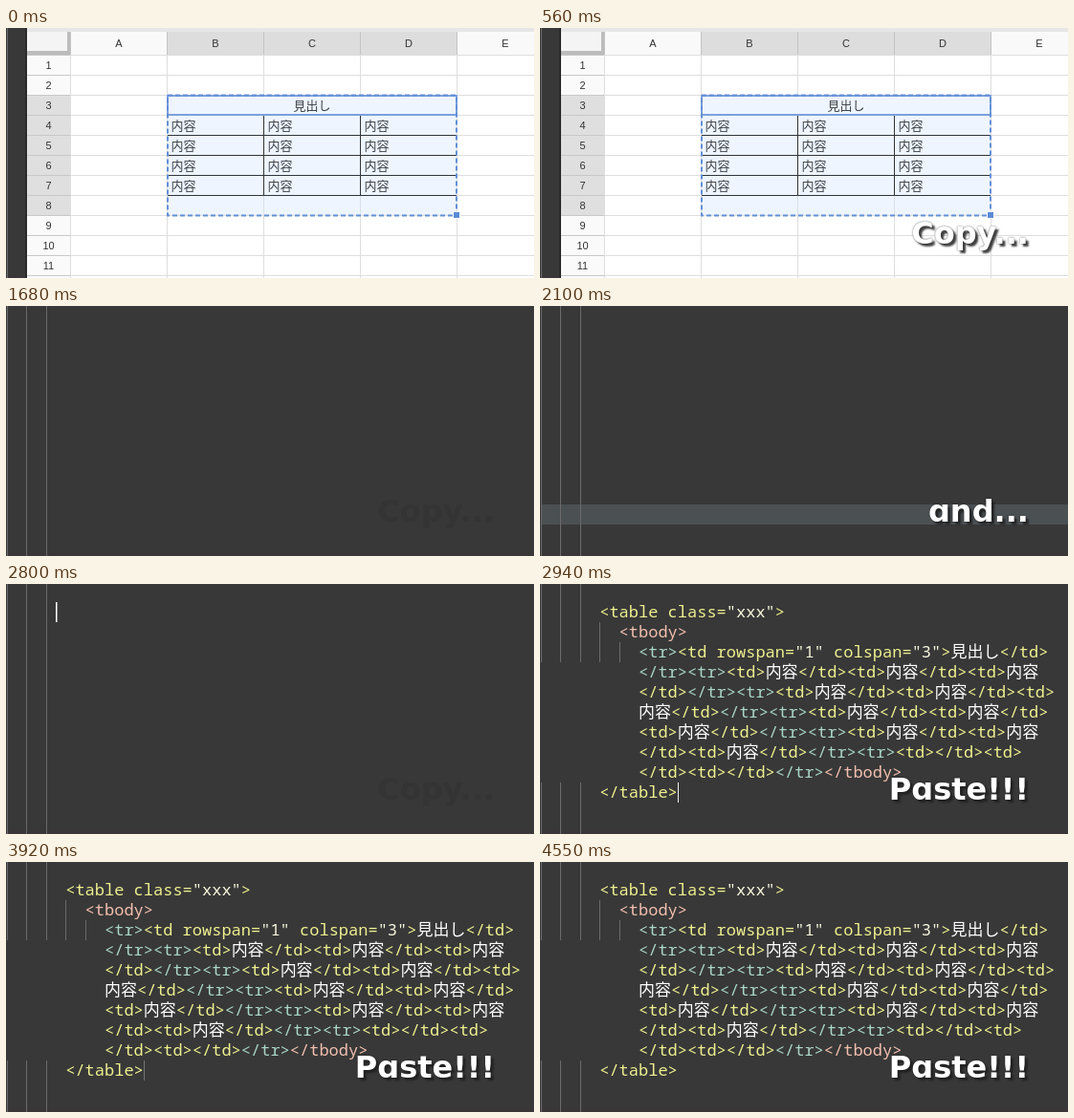
Animation of 552x262 px, one loop 4.62 s. Source, as an HTML page:

```html
<!DOCTYPE html>
<html lang="ja">
<head>
<meta charset="utf-8">
<title>Copy and paste a table</title>
<style>
html, body { margin: 0; width: 100%; height: 100%; overflow: hidden; background: #383838; }
#stage { position: relative; width: 552px; height: 262px; overflow: hidden; }
svg { position: absolute; left: 0; top: 0; display: block; }

.timed { opacity: 0; animation: 4620ms step-end infinite; }
.sheet { animation-name: sheet; }
.copy { animation-name: copy; }
.trace { animation-name: trace; }
.and { animation-name: and; }
.band { animation-name: band; }
.first-caret { animation-name: first-caret; }
.pasted { animation-name: pasted; }
.end-caret { animation-name: end-caret; }

@keyframes sheet { 0% { opacity: 1 } 36.363%, 100% { opacity: 0 } }
@keyframes copy { 0% { opacity: 0 } 10.606% { opacity: 1 } 34.848%, 100% { opacity: 0 } }
@keyframes trace {
  0% { opacity: 0 } 36.363% { opacity: 1 } 39.393% { opacity: 0 }
  60.606% { opacity: 1 } 63.636%, 100% { opacity: 0 }
}
@keyframes and { 0% { opacity: 0 } 39.393% { opacity: 1 } 60.606%, 100% { opacity: 0 } }
@keyframes band { 0% { opacity: 0 } 45.454% { opacity: 1 } 46.969%, 100% { opacity: 0 } }
@keyframes first-caret { 0% { opacity: 0 } 53.03% { opacity: 1 } 63.636%, 100% { opacity: 0 } }
@keyframes pasted { 0% { opacity: 0 } 63.636%, 100% { opacity: 1 } }
@keyframes end-caret {
  0% { opacity: 0 }
  63.636% { opacity: 1 }
  71.212% { opacity: 1; animation-timing-function: steps(6, start) }
  80.303% { opacity: 0 }
  83.333% { opacity: 0; animation-timing-function: steps(6, start) }
  92.424% { opacity: 1 }
  98.484%, 100% { opacity: 0 }
}

.caption {
  position: absolute; right: 41px; top: 197px; white-space: nowrap;
  font: bold 32px/37px "DejaVu Sans", sans-serif; color: #fff;
  text-shadow: 0 0 2px rgba(25,25,25,.7), 3px 3px 2px rgba(32,32,32,.85);
}
.caption.trace { color: #343434; text-shadow: none; }
.code text { font: 17px "Noto Sans Mono", "Noto Sans CJK JP", monospace; fill: #fff; }
.label { font: 11px "Liberation Sans", Arial, sans-serif; fill: #333; text-anchor: middle; }
.cell { font: 13px "Noto Sans CJK JP", sans-serif; fill: #3c4048; }
.table, .td { fill: #eef08f; }
.tbody { fill: #f3bfae; }
.tr { fill: #a9d6c6; }
.value { fill: #f6f6dc; }
</style>
</head>
<body>
<div id="stage">
  <svg width="552" height="262" viewBox="0 0 552 262">
    <rect width="552" height="262" fill="#383838"/>
    <rect y="259" width="552" height="3" fill="#3a3537"/>
    <rect class="timed band" x="2" y="208" width="550" height="21" fill="#4b5053"/>
    <path d="M1.5 0V262M21.5 0V262M42.5 0V262" stroke="#6a6a6a"/>
    <rect class="timed first-caret" x="52" y="19" width="1.5" height="21" fill="#fff"/>
    <g class="timed pasted">
      <rect y="82" width="60" height="126" fill="#383838"/>
      <path d="M62.5 40V82M83.5 61V82" stroke="#6a6a6a"/>
      <g class="code" id="code"></g>
    </g>
    <rect class="timed end-caret" x="144" y="208" width="1" height="21" fill="#f0f0f0"/>
    <g class="timed sheet" id="sheet"></g>
  </svg>
  <div class="caption timed copy">Copy...</div>
  <div class="caption timed trace">Copy...</div>
  <div class="caption timed and">ɑnd...</div>
  <div class="caption timed pasted">Pɑste!!!</div>
</div>
<script>
const rect = (x, y, w, h, fill) =>
  `<rect x="${x}" y="${y}" width="${w}" height="${h}" fill="${fill}"/>`;
const text = (x, y, content, attrs = "") => `<text x="${x}" y="${y}" ${attrs}>${content}</text>`;

function drawSheet() {
  const rowTop = row => 28 + 21 * (row - 1);
  const colLeft = col => 67 + 101 * col;
  const label = (x, y, name) => text(x, y, name, 'class="label"');
  let out = rect(20, 0, 2, 262, "#2b2b2b") + rect(22, 0, 530, 262, "#fff");

  // Headers
  out += rect(22, 4, 46, 24, "#f4f4f4") + rect(68, 4, 484, 24, "#f9f9f9");
  out += rect(168, 4, 304, 24, "#dddddd");
  out += rect(22, 28, 45, 234, "#fafafa") + rect(22, rowTop(3), 45, 126, "#dfdfdf");
  out += rect(22, 0, 530, 4, "#e6e6e6");
  out += rect(64, 4, 4, 24, "#bcbcbc") + rect(22, 24, 46, 4, "#bcbcbc");

  // Grid
  for (let row = 1; row <= 12; row++) {
    out += rect(22, rowTop(row), 45, 1, "#c8c8c8") + rect(67, rowTop(row), 485, 1, "#dedede");
    if (row < 12) out += label(44.5, rowTop(row) + 15, row);
  }
  for (let col = 0; col < 5; col++) {
    out += rect(colLeft(col), 4, 1, 24, "#c4c4c4") + rect(colLeft(col), 28, 1, 234, "#dedede");
    out += label(colLeft(col) + 51, 20, "ABCDE"[col]);
  }

  // Selected table
  out += rect(169, 71, 302, 125, "#eef5fe");
  out += rect(269, 176, 1, 20, "#d8dfe8") + rect(370, 176, 1, 20, "#d8dfe8");
  for (let row = 4; row <= 7; row++) {
    out += rect(169, rowTop(row + 1), 302, 1, "#30343b");
    for (let col = 1; col <= 3; col++)
      out += text(colLeft(col) + 4.5, rowTop(row) + 16, "内容", 'class="cell"');
  }
  out += rect(269, 91, 1, 85, "#30343b") + rect(370, 91, 1, 85, "#30343b");
  out += text(320, 86, "見出し", 'class="cell" text-anchor="middle"');
  out += `<g fill="none" stroke="#638fd6" stroke-width="2">
    <rect x="169" y="71" width="302" height="20" stroke="#7ba0dc"/>
    <rect x="169" y="70.5" width="302" height="126" stroke-dasharray="5 3"/></g>`;
  out += rect(467, 192, 8, 8, "#fff") + rect(468, 193, 6, 6, "#5b8bd8");
  sheet.innerHTML = out;
}

function drawCode() {
  const lines = [
    '<table class="xxx">',
    '<tbody>',
    '<tr><td rowspan="1" colspan="3">見出し</td>',
    '</tr><tr><td>内容</td><td>内容</td><td>内容',
    '</td></tr><tr><td>内容</td><td>内容</td><td>',
    '内容</td></tr><tr><td>内容</td><td>内容</td>',
    '<td>内容</td></tr><tr><td>内容</td><td>内容',
    '</td><td>内容</td></tr><tr><td></td><td>',
    '</td><td></td></tr></tbody>',
    '</table>'
  ];
  const paint = line => line.replace(/<(\/?(\w+)[^>]*)>/g, (_, body, name) => {
    const inner = body.replace(/"\w+"/g, '<tspan class="value">$&</tspan>');
    return `<tspan class="${name}">&lt;${inner}&gt;</tspan>`;
  });
  const indent = i => i === 0 || i === 9 ? 0 : i === 1 ? 1 : 2;
  code.innerHTML = lines
    .map((line, i) => text(62.2 + 20.4 * indent(i), 35 + 21 * i, paint(line)))
    .join("");
}

const sheet = document.getElementById("sheet");
const code = document.getElementById("code");
drawSheet();
drawCode();
</script>
</body>
</html>
```
